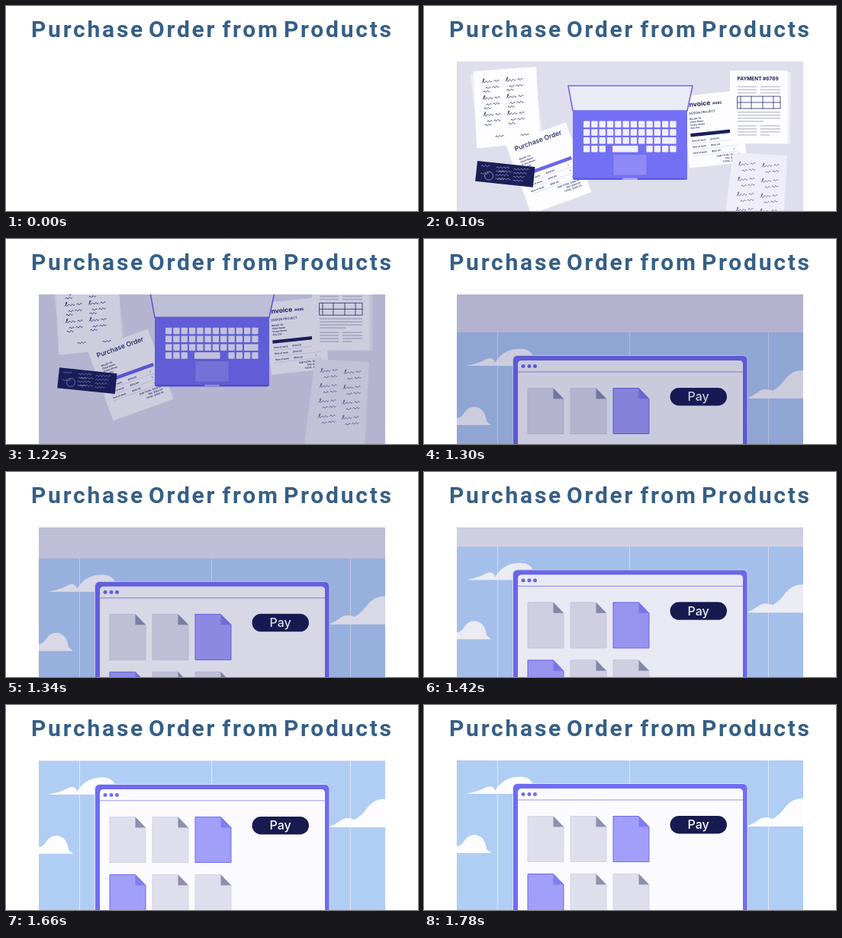
An HTML page for the animation above (3.94 s loop, 540 by 270 pixels).

```html
<!DOCTYPE html>
<html lang="en">
<head>
<meta charset="utf-8">
<title>Purchase Order from Products</title>
<style>
  html, body { margin: 0; width: 100%; height: 100%; overflow: hidden; background: #fff; }
  svg { display: block; width: 540px; height: 270px; }
  text { font-family: Inter, "Open Sans", sans-serif; fill: #1b2058; }
  .title { font: 600 30px Roboto, "Open Sans", sans-serif; letter-spacing: 2.75px; fill: #355f86; }
  .tiny { font-size: 3px; font-weight: 600; }
  .ink { fill: none; stroke: #252b66; stroke-width: .8; stroke-linecap: round; stroke-linejoin: round; }
  .paper { fill: #fdfdff; }
  .under { fill: #efeef7; }
  .soft { fill: #c9c9dd; }
  .hair { stroke: #c9c9e2; stroke-width: .5; }
</style>
</head>
<body>
<svg viewBox="0 0 540 270">
  <defs>
    <clipPath id="view"><rect x="43" y="73" width="454" height="197"/></clipPath>
  </defs>
  <text class="title" y="41"><tspan x="33">Purchase</tspan><tspan x="187">Order</tspan><tspan x="283.5">from</tspan><tspan x="364">Products</tspan></text>

  <g id="stage" clip-path="url(#view)">
    <rect x="43" y="73" width="454" height="197" fill="#dfdeed"/>

    <g id="desk">
      <path class="under" d="M61 90L145 83L156 178L72 188Z"/>
      <path class="paper" d="M65 86L147 80L152 179L69 187Z"/>
      <g id="notesLeft" class="ink"></g>

      <g transform="translate(107 182) rotate(-20)">
        <rect class="paper" width="84" height="98"/>
        <text x="9" y="13" font-size="8.7" font-weight="500">Purchase Order</text>
        <g id="orderBody"></g>
      </g>

      <g transform="translate(70 204) rotate(6)">
        <rect width="76" height="27" fill="#1b1f57"/>
        <g id="cardInk" fill="none" stroke="#b9bbdd" stroke-width=".6" stroke-linecap="round"></g>
        <circle cx="17" cy="18" r="5.5" fill="none" stroke="#c9cae6" stroke-width=".6"/>
      </g>

      <g transform="translate(338 119) rotate(-6)">
        <rect class="paper" width="76" height="95"/>
        <text x="6" y="15" font-size="8.5" font-weight="700">Invoice</text>
        <text x="39" y="15" font-size="4.6" font-weight="700">#485</text>
        <text x="7" y="25" font-size="4" font-weight="500">DESIGN PROJECT</text>
        <g id="invoiceBody"></g>
      </g>

      <path class="under" d="M405 86L481 87L480 182L405 181Z"/>
      <rect class="paper" x="401" y="85" width="75.500" height="96"/>
      <text x="410.500" y="98" font-size="6.500" font-weight="700">PAYMENT #6789</text>
      <g id="payLines" class="soft"></g>
      <path class="ink" d="M411 119H467V135H411ZM411 127H467M415 119V135M429 119V135M444 119V135M458 119V135"/>

      <path class="under" d="M405 193L476 197L470 310L391 306Z"/>
      <g id="notesRight" class="ink" style="stroke:#5b6090"></g>

      <path d="M189 105H352L345 138H195Z" fill="#ebebf5" stroke="#6d69ec" stroke-width="1.600" stroke-linejoin="round"/>
      <path d="M195 138H345V226Q345 229 342 229H198Q195 229 195 226Z" fill="#7470f6"/>
      <path d="M195 226.500H345Q345 229 342 229H198Q195 229 195 226.500Z" fill="#5f5be0"/>
      <rect x="260" y="226.500" width="20" height="2.500" rx="1" fill="#aaa8f8"/>
      <rect x="248" y="195.500" width="44" height="27.500" fill="#8d8af7" stroke="#6764e6" stroke-width=".6"/>
      <g id="keys" fill="#f1f0fb"></g>
    </g>

    <g id="site">
      <rect x="43" y="73" width="454" height="260" fill="#b0cdf4"/>
      <path d="M96.500 73V280M269.500 73V280M451.500 73V280" stroke="#dfeafb"/>
      <g fill="#fdfdff">
        <path d="M55 117Q70 114 78 110Q88 104 92 110L93 113Q103 97 119 95Q138 92 143 104L146 117Z"/>
        <path d="M43 186Q48 186 52 180Q57 171 67 171Q80 173 82 190L88 195H43Z"/>
        <path d="M422 160Q433 156 440 150Q447 146 457 150Q466 145 473 135Q483 122 497 123V160Z"/>
      </g>
      <rect x="116.500" y="103.500" width="307.500" height="220" rx="6" fill="#706cf5" stroke="#dfe3fb"/>
      <path d="M123 290V115Q123 110 128 110H413Q418 110 418 115V290Z" fill="#fbfbff"/>
      <path d="M123 125H418" stroke="#9693f2"/>
      <g fill="#706cf5">
        <circle cx="130" cy="117.500" r="2.500"/><circle cx="138" cy="117.500" r="2.500"/><circle cx="145.500" cy="117.500" r="2.500"/>
      </g>
      <g id="files"></g>
      <rect x="322.500" y="146" width="74.500" height="23.500" rx="11.750" fill="#171b50"/>
      <text x="359.700" y="163.300" font-size="16" font-weight="500" text-anchor="middle" style="fill:#fff">Pay</text>
    </g>

    <rect id="shade" x="43" y="73" width="454" height="197" fill="#14145f" opacity="0"/>
  </g>
</svg>

<script>
const $ = id => document.getElementById(id);
const range = n => [...Array(n).keys()];
const rect = (x, y, w, h, more = '') => `<rect x="${x}" y="${y}" width="${w}" height="${h}" ${more}/>`;
const tiny = (x, y, s, end) => `<text class="tiny" x="${x}" y="${y}"${end ? ' text-anchor="end"' : ''}>${s}</text>`;

// Handwriting: a tall looped initial, small waves, then an indented second line.
const wave = n => range(n).map(i => `q1 ${i % 2 ? 2 : -2.5} 2.1 -.2`).join('');
const scrawl = (x, y) => `<path d="M${x} ${y}q3 -2 3 -5q-2 -1 -1.500 4q1 2 3 0${wave(4)}m3 -.4${wave(3)}` +
  `M${x + 5} ${y + 7}${wave(3)}m2.500 -.4${wave(4)}"/>`;
const dash = (x, y, n) => `<path d="M${x} ${y}${wave(n)}"/>`;

$('notesLeft').innerHTML = range(6).map(i => {
  const col = i % 2, row = i >> 1;
  return scrawl(76 + col * 31 + row, 101 + row * 22 - col * 2) + dash(78 + col * 31 + row, 113 + row * 22 - col * 2, 4);
}).join('') + dash(94, 172, 5) + dash(127, 170, 5);

$('notesRight').innerHTML = range(8).map(i => {
  const col = i % 2, row = i >> 1;
  return scrawl(412 + col * 31 - row, 210 + row * 20 + col * 2);
}).join('');

$('cardInk').innerHTML = range(4).map(r => dash(6 + r % 2 * 20, 6 + r * 5, 5) + dash(26 + r % 2 * 3, 6 + r * 5, 8) + dash(49, 6 + r * 5, 9 - r)).join('');

// Shared billing layout for the two invoices.
const bill = (x, w, y, bar) => {
  const end = x + w;
  let s = ['BILLED TO:', 'Client Name', '12 Any Street', 'Any City'].map((t, i) => tiny(x + 1, y + i * 4, t)).join('');
  s += rect(x, y + 18, w, 4.5, `fill="${bar}"`);
  s += range(3).map(i => {
    const ly = y + 29 + i * 8;
    return tiny(x + 1, ly, 'Item of work') + tiny(x + w * .6, ly, '$100.00', true) + tiny(end - 8, ly, '1') +
      `<path class="hair" d="M${x} ${ly + 2.500}H${end}"/>`;
  }).join('');
  return s + ['SUB TOTAL', 'TAX', 'TOTAL'].map((t, i) =>
    tiny(end - 14, y + 52 + i * 4, t, true) + tiny(end, y + 52 + i * 4, '$300.00', true)).join('');
};
$('orderBody').innerHTML = bill(9, 66, 26, '#6a66ee');
$('invoiceBody').innerHTML = bill(6, 62, 32, '#1b1f57');

$('payLines').innerHTML = range(3).map(i => rect(411, 105.5 + i * 4, 25, 1.6) + rect(441, 105.5 + i * 4, 26, 1.6)).join('') +
  range(4).map(i => rect(411, 139 + i * 4, i == 3 ? 34 : 56, 1.6)).join('') +
  range(4).map(i => rect(411, 157 + i * 4, 25, 1.6) + rect(441, 157 + i * 4, i == 3 ? 12 : 26, 1.6)).join('');

const pitch = 10.3;
$('keys').innerHTML = range(4).map(row => range(12).map(i => {
  const y = 151.5 + row * 10.8;
  if (row == 3 && i > 2 && i < 8) return i == 4 ? rect(247, y, 33.5, 8.5, 'rx=".8"') : '';
  if (row == 2 && i == 11) return '';
  return rect(209 + i * pitch, y, row == 2 && i == 10 ? 18.6 : 8.3, 8.5, 'rx=".8"');
}).join('')).join('');

const file = (x, y, on) => {
  const [body, edge, fold] = on ? ['#a19ff9', '#6f6bf0', '#807df0'] : ['#dfdeec', '#d3d2e4', '#8c90ae'];
  return `<path d="M${x} ${y}h33.500l13.500 14v46h-47z" fill="${body}" stroke="${edge}" stroke-linejoin="round"/>` +
    `<path d="M${x + 33.5} ${y}v14h13.500z" fill="${fold}"/>`;
};
$('files').innerHTML = range(6).map(i =>
  file(136 + i % 3 * 56, i < 3 ? 146.5 : 222.5, i == 2 || i == 3)).join('');

const LOOP = 3940, SHOW = 100, LEAVE = 1120, CUT = 1240, LAND = 1717, STEP = 40;
const start = performance.now();

function draw() {
  const t = (performance.now() - start) % LOOP;
  // The move advances in 40 ms steps.
  const s = t < 1140 ? 0 : 1140 + Math.floor((t - 1140) / STEP) * STEP;
  const out = Math.max(0, (s - LEAVE) / (CUT - LEAVE));
  const left = Math.max(0, (LAND - s) / (LAND - 1300));
  const second = s >= CUT;

  $('stage').style.display = t < SHOW ? 'none' : '';
  $('desk').style.display = second ? 'none' : '';
  $('site').style.display = second ? '' : 'none';
  $('desk').setAttribute('transform', `translate(0 ${-60 * out ** 3})`);
  $('site').setAttribute('transform', `translate(0 ${50 * left ** 2})`);
  $('shade').setAttribute('opacity', second ? .21 * left ** 3 : .25 * out);
  requestAnimationFrame(draw);
}
draw();
</script>
</body>
</html>
```
